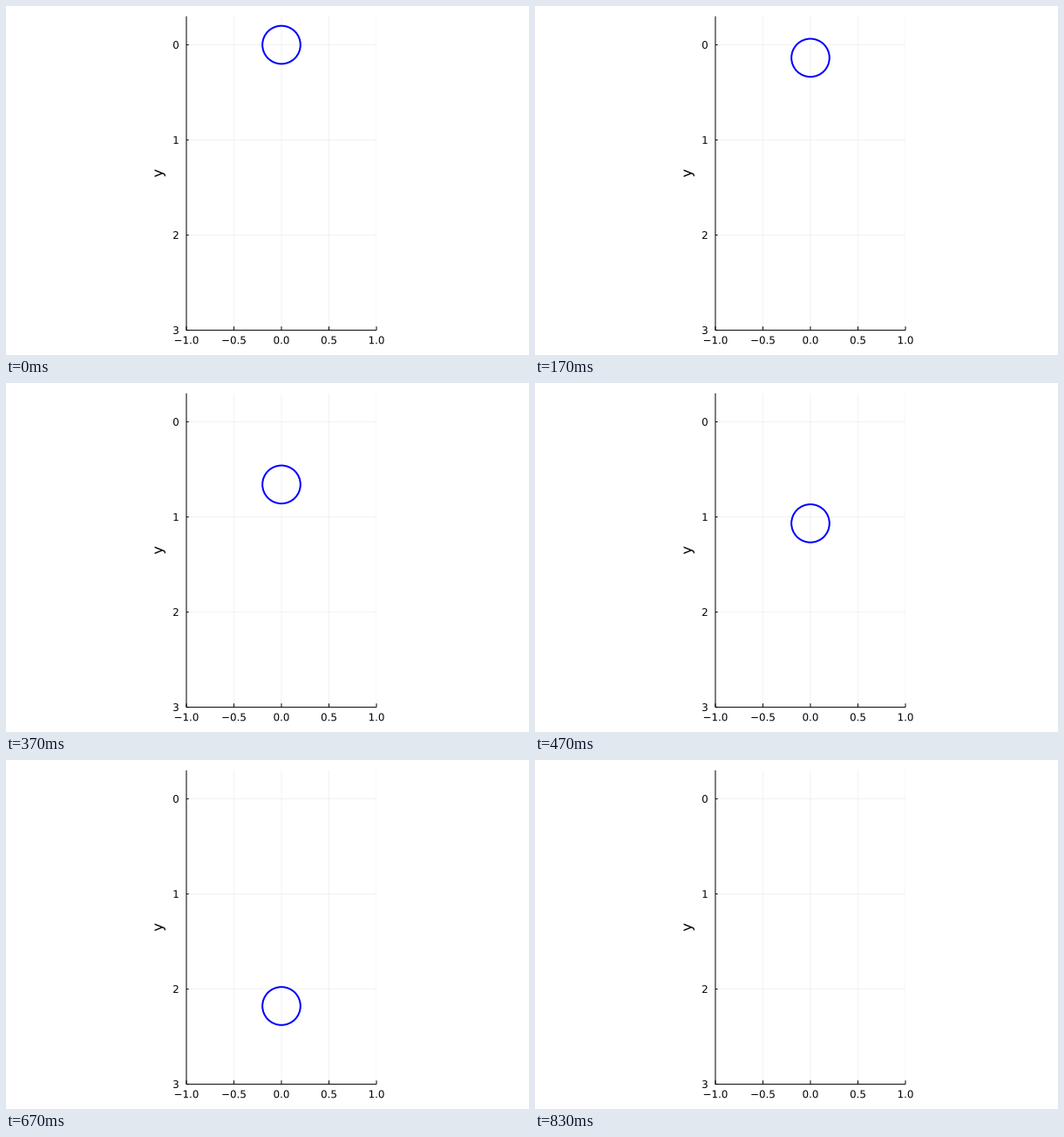
A matplotlib script that plays this animation: 600x400 px, repeating every 1.03 s.

```python
import matplotlib.pyplot as plt
from matplotlib.animation import FuncAnimation
from matplotlib.patches import Circle, PathPatch, Rectangle
from matplotlib.textpath import TextPath
from matplotlib.transforms import Affine2D

WIDTH, HEIGHT, DPI = 600, 400, 100
PX = 72 / DPI                      # points per pixel
TOP, BOTTOM, CENTER = 11.81, 371.61, 315.98
Y_MIN, Y_MAX = -0.3, 3.0
SCALE = (BOTTOM - TOP) / (Y_MAX - Y_MIN)
LEFT, RIGHT = CENTER - SCALE, CENTER + SCALE

TICK_SIZE, LABEL_SIZE = 11.85, 16.3
TICK_FRACTION = 0.012
GRAVITY, RADIUS = 9.8, 0.2
STEP_RATE = 30                     # simulation steps per second
FRAMES, INTERVAL = 103, 10

plt.rcParams["font.family"] = "DejaVu Sans"

fig = plt.figure(figsize=(WIDTH / DPI, HEIGHT / DPI), dpi=DPI, facecolor="white")
ax = fig.add_axes([0, 0, 1, 1])
ax.set_xlim(0, WIDTH)
ax.set_ylim(HEIGHT, 0)
ax.axis("off")
plot_area = Rectangle((LEFT, TOP), RIGHT - LEFT, BOTTOM - TOP, transform=ax.transData)


def to_x(x):
    return CENTER + x * SCALE


def to_y(y):
    return TOP + (y - Y_MIN) * SCALE


def line(x0, y0, x1, y1, width=1.0, alpha=1.0):
    (item,) = ax.plot([x0, x1], [y0, y1], color="black", lw=width * PX,
                      alpha=alpha, solid_capstyle="butt", snap=False)
    return item


def grid_line(*ends):
    line(*ends, width=0.5, alpha=0.1).set_clip_path(plot_area)


def advance(text, size):
    widths = {"−": 0.838, ".": 0.318, "y": 0.592}
    return size * sum(widths.get(char, 0.636) for char in text)


def draw_text(text, x, baseline, size, align=0.5, angle=0):
    """Place text by its advance width, with sub-pixel accuracy."""
    path = TextPath((-align * advance(text, size), 0), text, size=size)
    place = Affine2D().scale(1, -1).rotate_deg(-angle).translate(x, baseline)
    ax.add_patch(PathPatch(place.transform_path(path), fc="black", lw=0, snap=False))


x_ticks = (-1.0, -0.5, 0.0, 0.5, 1.0)
y_ticks = (0, 1, 2, 3)
for value in x_ticks:
    grid_line(to_x(value), BOTTOM, to_x(value), TOP)
for value in y_ticks:
    grid_line(LEFT, to_y(value), RIGHT, to_y(value))

line(LEFT, BOTTOM, RIGHT, BOTTOM)
line(LEFT, BOTTOM, LEFT, TOP)

for value in x_ticks:
    x = to_x(value)
    line(x, BOTTOM, x, BOTTOM - TICK_FRACTION * (BOTTOM - TOP))
    draw_text(f"{value:.1f}".replace("-", "−"), x, 387.21, TICK_SIZE)
for value in y_ticks:
    y = to_y(value)
    line(LEFT, y, LEFT + TICK_FRACTION * (RIGHT - LEFT), y)
    draw_text(str(value), LEFT - 8.25, y + 4.32, TICK_SIZE, align=1)
draw_text("y", 179.5, (TOP + BOTTOM) / 2, LABEL_SIZE, angle=90)

ball = Circle((CENTER, to_y(0)), RADIUS * SCALE, fill=False, ec="blue",
              lw=2 * PX, zorder=5, snap=False)
ax.add_patch(ball)
ball.set_clip_path(plot_area)


def update(frame):
    step = int(frame * INTERVAL * STEP_RATE / 1000 + 0.15)
    time = step / STEP_RATE
    ball.center = CENTER, to_y(GRAVITY * time ** 2 / 2)
    return (ball,)


anim = FuncAnimation(fig, update, frames=FRAMES, interval=INTERVAL,
                     repeat=True, repeat_delay=0, blit=False)
plt.show()
```
